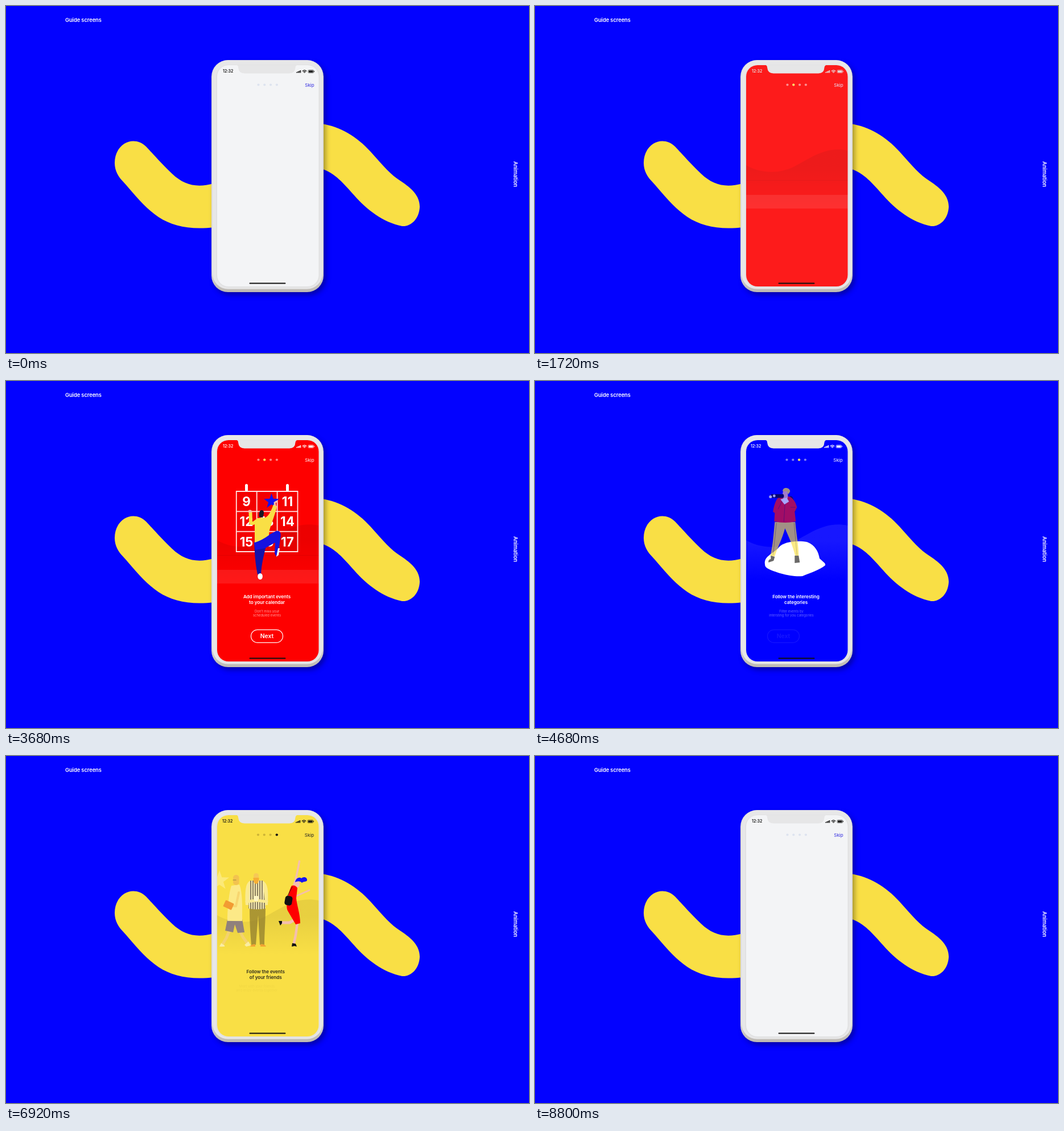
These frames come from a looping animation (919 by 610 pixels, 9.12 s). An HTML page:

```html
<!DOCTYPE html>
<html lang="en">
<head>
<meta charset="utf-8">
<title>Guide screens</title>
<style>
html, body { margin: 0; width: 100%; height: 100%; overflow: hidden; background: #0302ff; }
svg { display: block; width: 919px; height: 610px; font-family: Inter, sans-serif; }
.label { font-size: 9.4px; font-weight: 600; fill: #fff; letter-spacing: -.1px; }
.title { font-size: 8.2px; font-weight: 600; letter-spacing: -.1px; text-anchor: middle; }
.sub { font-size: 5.9px; text-anchor: middle; }
.next { font-size: 10.4px; font-weight: 600; text-anchor: middle; }
.num { font-weight: 700; fill: #fff; text-anchor: middle; }
.limb { fill: none; stroke-linecap: round; stroke-linejoin: round; }
</style>
</head>
<body>
<svg viewBox="0 0 919 610">
  <defs>
    <clipPath id="display"><rect x="371" y="104" width="178.5" height="389" rx="20"/></clipPath>
    <linearGradient id="body" x2="0" y2="1">
      <stop offset=".9" stop-color="#dddcdc"/><stop offset="1" stop-color="#bdb9b2"/>
    </linearGradient>
    <linearGradient id="fadeDark" x2="0" y2="1">
      <stop offset=".3" stop-opacity=".07"/><stop offset="1" stop-opacity="0"/>
    </linearGradient>
    <linearGradient id="fadeLight" x2="0" y2="1">
      <stop offset=".3" stop-color="#fff" stop-opacity=".09"/><stop offset="1" stop-color="#fff" stop-opacity="0"/>
    </linearGradient>
    <linearGradient id="mist" x2="0" y2="1">
      <stop offset="0" stop-color="#e9effb" stop-opacity="0"/><stop offset=".6" stop-color="#ebf1fa"/>
      <stop offset="1" stop-color="#ebf1fa" stop-opacity="0"/>
    </linearGradient>
    <pattern id="stripes" width="4" height="8" patternUnits="userSpaceOnUse">
      <rect width="4" height="8" fill="#f4f0e4"/><rect width="2" height="8" fill="#57506a"/>
    </pattern>
  </defs>
  <text class="label" x="104" y="28.3">Guide screens</text>
  <text class="label" transform="translate(892 273) rotate(90)">Animation</text>
  <g fill="#f9df45">
    <path d="M365 312C335 320 313 315 292 295C274 278 262 264 246 247C224 226 191 242 191 276C191 290 198 301 206 309C222 326 240 352 268 371C292 387 325 394 365 389Z"/>
    <path d="M554 207C590 212 620 232 645 261C662 280 676 297 694 308C712 320 727 333 727 353C726 374 712 388 696 387C662 380 634 358 612 333C594 313 578 293 554 286Z"/>
  </g>
  <rect x="361" y="95" width="197" height="408" rx="29" fill="url(#body)" style="filter:drop-shadow(4px 5px 4px #0005)"/>
  <rect x="363" y="95.5" width="193" height="402" rx="27" fill="#e7e7e8"/>
  <rect x="369" y="103" width="182.500" height="392" rx="22" fill="#e1e1e2"/>
  <g id="screens" clip-path="url(#display)"></g>
  <path d="M404 103.500Q408 104 408 108Q409 118.500 419 118.500H498Q508 118.500 508.500 108Q509 104 513 103.500Z" fill="#e6e6e7"/>
</svg>
<script>
const LOOP = 9120, ENTER = 500, LEAVE = 320;
const RED = '#fe0000', BLUE = '#1414f5', YELLOW = '#f9df45', SKIN = '#f5bfae';

const enter = (start, html, x = 22) => `<g data-in="${start}" data-x="${x}">${html}</g>`;
const leave = (start, html) => `<g data-out="${start}">${html}</g>`;
const limb = (d, color, width) => `<path class="limb" d="${d}" stroke="${color}" stroke-width="${width}"/>`;
const shape = (d, color) => `<path d="${d}" fill="${color}"/>`;
const oval = (x, y, rx, ry, color) => `<ellipse cx="${x}" cy="${y}" rx="${rx}" ry="${ry}" fill="${color}"/>`;
const box = (x, y, w, h, r, color) => `<rect x="${x}" y="${y}" width="${w}" height="${h}" rx="${r}" fill="${color}"/>`;
const lines = (kind, x, last, step, color, rows) => rows.map((row, i) =>
  `<text class="${kind}" x="${x}" y="${last - (rows.length - 1 - i) * step}" fill="${color}">${row}</text>`).join('');
const star = (x, y, r, color) => {
  const points = [...Array(10)].map((_, i) => {
    const a = (i / 5 - .5) * Math.PI, d = i % 2 ? r * .4 : r;
    return [x + d * Math.cos(a), y + d * Math.sin(a)];
  });
  return `<polygon points="${points}" fill="${color}"/>`;
};

function chrome(ink, skip, idle, shift = 0) {
  const bars = [0, 1, 2, 3].map(i => box(510 + i * 2.2, 116 - i, 1.6, 1.6 + i, .4, ink)).join('');
  const dots = [0, 1, 2, 3].map(i => oval(443.5 + i * 10.8, 138.5, 2.1, 2.1, idle)).join('');
  return `<g transform="translate(${shift})">
    <text x="381" y="117.400" font-size="7" font-weight="600" fill="${ink}">12:32</text>${bars}
    ${limb('M521.3 114.300Q524.500 111.300 527.700 114.300M522.800 115.900Q524.500 114.400 526.200 115.900', ink, 1.2)}${oval(524.5, 117, .8, .8, ink)}
    <rect x="531" y="112.600" width="9.600" height="5" rx="1.300" fill="none" stroke="${ink}" stroke-width=".6"/>
    ${box(532, 113.5, 7.6, 3.2, .6, ink)}${box(541.2, 114, .8, 2.2, .4, ink)}</g>
    <g transform="translate(${shift / 2})">${dots}<text x="525.300" y="142.300" font-size="8" fill="${skip}">Skip</text></g>
    ${box(427.5, 486.4, 64, 2.2, 1.1, '#111')}`;
}
const active = (i, color) => oval(443.5 + i * 10.8, 138.5, 2.1, 2.1, color);

function copy(x, title, sub, ink, soft, line, times, bx = 458.5) {
  const button = `<rect x="${bx - 28}" y="437.300" width="56" height="22.600" rx="11.300" fill="none" stroke="${line}" stroke-width="1.200"/>
    <text class="next" x="${bx}" y="452.400" fill="${line}">Next</text>`;
  return enter(times[0], lines('title', x, 392, 10.4, ink, title), 20)
    + enter(times[1], lines('sub', x, 414, 7.5, soft, sub), 20) + enter(times[2], button, 24);
}
const hill = fill => shape('M371 280C392 292 424 298 456 282C486 266 512 246 549.500 254V350H371Z', `url(#${fill})`);

function calendar([x, y, w, color, label]) {
  const h = w * .96, top = y - h / 2 + w * .07;
  const peg = side => box(x + side * w * .27 - w * .06, top - w * .16, w * .12, w * .3, w * .06, color);
  return peg(-1) + peg(1) + box(x - w / 2, top, w, h, w * .13, color)
    + `<text class="num" x="${x}" y="${top + h * .68}" font-size="${w * .52}">${label}</text>`;
}

function meditation() {
  const days = [[418.5, 204.5, 16, '#fd1515', 19], [497.5, 211, 19, BLUE, 9], [545, 217.5, 16, '#f9e052', 1],
    [373, 229, 18, BLUE, 10], [406, 249, 25, '#f9e052', 22], [514.5, 249, 25, BLUE, 25],
    [372, 297, 30, BLUE, 11], [547, 292, 30, '#fd1515', 14]];
  const person = shape('M442 222H474L464 246H453Z', '#dfe3f8aa') + box(453.3, 240, 10.6, 28, 5.3, SKIN)
    + shape('M432 303C415 306 409 316 408 326Q460 320 509 320C505 306 490 303 483 305Z', '#1f1bb4')
    + shape('M458 257C447 256 435 268 431 284L427 295L415 283L411 287Q421 302 429 304L437 303L459 307L482 304L488 304Q498 300 505 287L502 283L490 295L486 282C482 267 470 256 458 257Z', '#fd1515')
    + limb('M459 266V306M438 285L436 302M480 285L482 302', '#a90b1c', .7)
    + limb('M412 285L406 282M411 284L408 279M505 285L511 282M506 284L509 279', SKIN, 2)
    + shape('M408 324C405 333 414 336 424 335C440 334 450 329 459 328C472 332 490 336 504 333C512 330 511 322 509 318C490 317 470 318 459 321C445 317 420 316 408 324Z', BLUE)
    + oval(437, 316.500, 10, 2.4, SKIN) + oval(475, 316.500, 9, 2.4, SKIN);
  return enter(150, box(371, 245, 179, 105, 0, 'url(#mist)') + oval(512, 268, 28, 9, '#e4eaf866') + oval(530, 258, 20, 10, '#e4eaf866'), 0)
    + enter(180, person)
    + `<g data-drift=".012">${days.map((d, i) => enter(260 + i * 25, calendar(d))).join('')}</g>`;
}

function climber() {
  const grid = `<path d="M404.800 194H512.500V300H404.800ZM440.700 194V300M476.600 194V300M404.800 229.400H512.500M404.800 264.700H512.500" fill="#0000000a" stroke="#ffe4e2" stroke-width="1.800"/>`
    + box(420, 181, 5, 13, 2.5, '#fff') + box(492, 181, 5, 13, 2.5, '#fff');
  const digits = [9, '', 11, 12, 13, 14, 15, 16, 17].map((n, i) =>
    `<text class="num" font-size="22.500" x="${422.5 + i % 3 * 36}" y="${220 + (i / 3 | 0) * 35.4}">${n}</text>`).join('');
  const person = limb('M430 249L429.500 231', YELLOW, 6) + oval(428.7, 229, 3.2, 2.6, SKIN)
    + shape('M436 283L437 300C438 318 440 330 442 340H448C449 322 453 306 457 290Z', '#1412a8')
    + shape('M436 283C448 280 462 270 474 264C482 262 484 268 482 277L479 298L475 309L472 303L473 284Q464 289 455 294L438 297Z', '#1512e0')
    + shape('M478 294L481 294L479 306L475 309Z', '#fff')
    + shape('M427 248Q430 256 437 252L437 284Q450 280 462 271L463 262C467 248 474 232 476 220L470 217C466 228 462 237 456 240L442 241L434 247Z', YELLOW)
    + limb('M473 219L472 214L475 212', SKIN, 3) + shape('M445 239C444 232 446 226 450 227C455 228 453 235 451 240Z', '#191525')
    + oval(446.6, 343.500, 4.3, 5.5, '#fff');
  return box(371, 332, 179, 24, 0, '#ffffff18') + box(371, 306, 179, 1, 0, '#00000010') + enter(1900, grid) + enter(2040, digits)
    + enter(2260, star(466.5, 211.5, 14, '#1410f0')) + enter(2300, person);
}

function lookout() {
  const rock = shape('M404 322C402 308 418 304 428 293C436 282 462 280 478 283C492 288 498 300 500 312C506 318 511 320 510 324C500 332 482 338 470 343C450 345 420 336 408 329C405 327 404 325 404 322Z', '#fff');
  const person = shape('M422 248H458C460 270 464 290 464 308H458C454 290 447 275 440 259C435 278 427 292 422 308H414C419 288 420 268 422 248Z', YELLOW)
    + limb('M425 250L419 306M456 250L461 306', '#7a6a20', .6)
    + shape('M415 307L422 309L420 316L411 319Q410 314 415 313ZM457 307H464L466 319L457 320Z', '#1c1a18')
    + shape('M449 202Q457 201 458 230L451 232Z', '#17143c')
    + shape('M430 204C424 206 420 222 419 230L422 232L421 247Q440 251 459 247L457 230L461 222C458 210 452 204 446 203Z', '#f71515')
    + limb('M440 214L438 247M428 225L435 211M450 222L458 222', '#70103a', .7)
    + box(436, 193, 9, 15, 4, SKIN) + shape('M432 208L443 205L447 212L439 217Z', '#fff')
    + shape('M436 194C435 186 448 186 449 194L446 199L443 194Z', YELLOW)
    + `<g data-look="4900">${box(415, 199, 23, 6.5, 2, '#0a0820')}${oval(414.5, 203.5, 2.6, 2.6, '#eee')}${oval(421, 202, 2.4, 2.4, '#eee')}</g>`;
  return enter(4120, rock) + enter(4390, `<g transform="translate(7)">${person}</g>`);
}

function friends() {
  const dancer = limb('M504 233Q511 212 515.500 185', SKIN, 3.4) + limb('M508 247L533 236', SKIN, 2.6)
    + limb('M507 288L498 293H483', SKIN, 5) + limb('M512 294L509 315L505.500 331', SKIN, 4.4)
    + shape('M485 290L479 290L482 298L485 294ZM503 329L509 330L511 335L507 334L502 335Z', '#111')
    + oval(512, 225, 4, 6, SKIN)
    + shape('M508 222C509 214 516 212 519 215C523 211 530 213 529 219C526 222 523 220 520 223C517 219 511 220 508 222Z', BLUE)
    + shape('M502 228C498 234 490 262 495 272L509 296L517 294C517 278 511 262 510 250L512 232Q508 226 502 228Z', RED)
    + limb('M503 230L493 249', '#111', .8)
    + `<rect x="490" y="246" width="13" height="16.500" rx="4.500" fill="#111" transform="rotate(10 496 254)"/>`;
  const man = shape('M427 264H455C455 290 453 312 453 332H445L442 280L438 332H430C428 310 427 290 427 264Z', '#88752c')
    + shape('M429 219C419 222 419 240 420 262L427 262L432 235L450 235L453 262H459C460 238 460 223 449 219Z', '#fbf0b4')
    + shape('M428 219H450L455 268Q440 271 425 268Z', 'url(#stripes)')
    + limb('M422 256L438 254M457 256L441 254', '#fbf0b4', 5) + box(435, 246, 7, 9, 1, '#fff')
    + box(434, 206, 9, 14, 4.5, '#f6c05e') + shape('M433.500 214H443.500Q444 224 438.500 225Q433 224 433.500 214Z', '#f59a2e')
    + shape('M428 335Q431 330 437 331V335ZM446 331Q453 330 456 335H446Z', '#f08a2a');
  const reader = limb('M393 308L388 320L380 333', '#f7cf9a', 5) + limb('M412 308L417 318L425 329', '#f7cf9a', 5)
    + shape('M376 335L379 329L385 333V335ZM420 332L427 326L431 333L423 335Z', '#fff')
    + shape('M390 287H416L420 310L408 311L403 296L400 310L386 307Z', '#3831b6')
    + shape('M397 228L411 226C417 240 416 270 416 290H390C390 265 393 240 397 228Z', '#fff3c8')
    + box(400, 209, 10.5, 18, 5, '#eda95a') + limb('M400 218H405', '#333', 1.2)
    + limb('M410 240L405 264L394 263', '#f7cf9a', 4)
    + `<rect x="384" y="256" width="16" height="12" rx="1" fill="#ec5a20" transform="rotate(25 392 262)"/>`;
  return enter(6350, dancer) + enter(6620, `<g transform="translate(8)">${man}</g>`)
    + enter(6670, `<g transform="translate(10)">${reader}</g>`)
    + enter(6690, star(390, 219, 18, '#fff6bb'), 26);
}

const screen = (from, to, fade, bg, html) =>
  `<g data-from="${from}" data-to="${to}" data-fade="${fade}">${box(371, 104, 179, 389, 0, bg)}${html}</g>`;

const stage = document.getElementById('screens');
stage.innerHTML =
  box(371, 104, 179, 389, 0, '#f3f4f6') + chrome('#111', '#3029e0', '#dde3ef')
  + leave(1400, enter(200, active(0, '#413bd0'), 0) + meditation()
    + copy(459.5, ['Look for events'], ['Be aware of', 'upcoming events'], '#161616', '#c3c3c6', '#4a44ea', [160, 270, 390], 457.3))
  + screen(1400, 4200, 1, RED, chrome('#fff', '#fff', '#ff8585') + hill('fadeDark')
    + leave(3680, active(1, '#ffdc50') + climber()
    + copy(458.5, ['Add important events', 'to your calendar'], ['Don’t miss your', 'scheduled events'], '#fff', '#ff9d9d', '#fff', [1900, 2180, 2410])))
  + screen(3680, 6640, 1, '#0000ff', chrome('#fff', '#fff', '#7c7cf6', -2) + hill('fadeLight')
    + leave(6120, `<g transform="translate(-1)">${active(2, '#ffe360')}</g>` + lookout()
    + copy(458.5, ['Follow the interesting', 'categories'], ['Filter events by', 'intersting for you categories'], '#fff', '#a9a9ff', '#fff', [4120, 4405, 4580])))
  + screen(6120, 8200, 560, YELLOW, chrome('#111', '#222', '#cdb436', -1) + hill('fadeDark')
    + leave(8200, active(3, '#111') + friends()
    + copy(458.5, ['Follow the events', 'of your friends'], ['Meet with your friends', 'and enjoy events together'], '#161616', '#a8932c', '#222', [6540, 6805, 6960])));

const ramp = (t, start, length) => Math.min(1, Math.max(0, (t - start) / length));
const ease = p => p < .5 ? 2 * p * p : 1 - 2 * (1 - p) ** 2;
const parts = key => [...stage.querySelectorAll(`[data-${key}]`)];
const [entering, leaving, fading, drifting, looking] = ['in', 'out', 'from', 'drift', 'look'].map(parts);

function place(el, opacity, x) {
  el.setAttribute('opacity', opacity);
  el.setAttribute('transform', `translate(${x})`);
}

function draw() {
  const t = performance.now() % LOOP;
  for (const el of entering) {
    const k = ease(ramp(t, +el.dataset.in, ENTER));
    place(el, k, (k - 1) * el.dataset.x);
  }
  for (const el of leaving) {
    const k = ease(ramp(t, +el.dataset.out, LEAVE));
    place(el, 1 - k, k * 20);
  }
  for (const el of fading) {
    const { from, to, fade } = el.dataset;
    el.setAttribute('opacity', ease(ramp(t, +from, 420)) * (1 - ease(ramp(t, +to, +fade))));
  }
  for (const el of drifting) el.setAttribute('transform', `translate(${(t - 960) * el.dataset.drift})`);
  for (const el of looking) {
    const angle = 5 * Math.sin(2 * Math.PI * ramp(t, +el.dataset.look, 820));
    el.setAttribute('transform', `rotate(${angle} 438 202)`);
  }
  requestAnimationFrame(draw);
}
draw();
</script>
</body>
</html>
```
